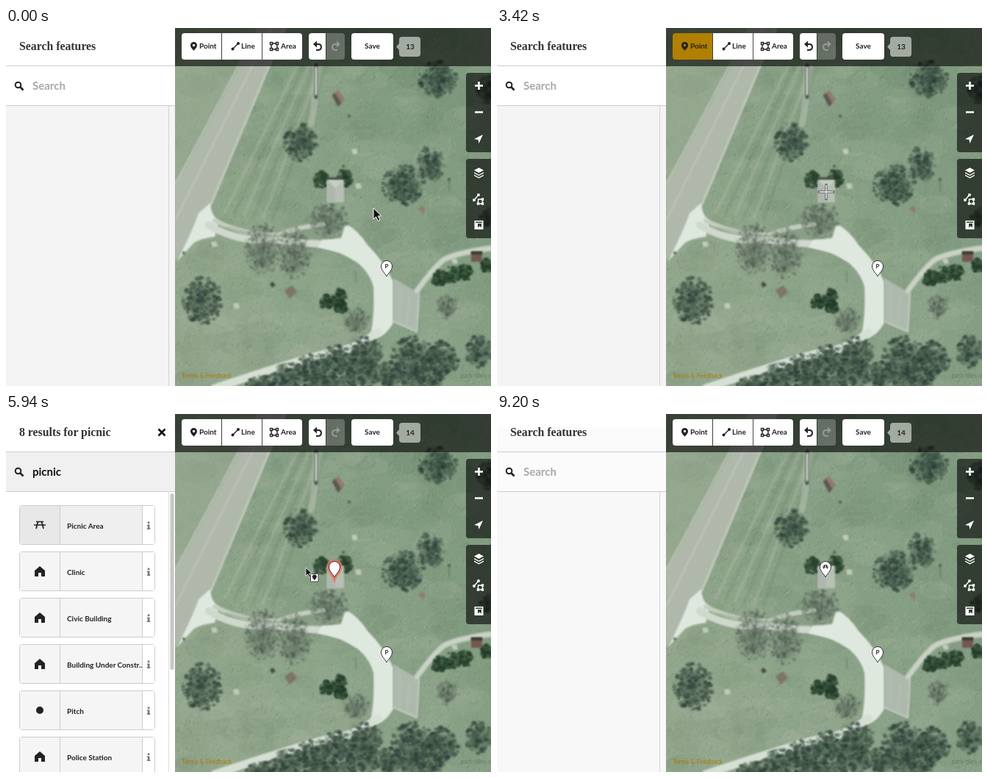
Write an HTML page with a canvas that moves like this. It is 660 px wide and 487 px high and loops after 9830 ms.

```html
<!DOCTYPE html>
<html lang="en">
<head>
<meta charset="utf-8">
<title>Adding a picnic area</title>
<style>
html, body { margin: 0; width: 100%; height: 100%; overflow: hidden; background: #fff; }
canvas, #ui { position: absolute; left: 0; top: 0; width: 660px; height: 487px; }
text { font-family: Lato, "Open Sans", sans-serif; white-space: pre; }
.title { font-family: "Liberation Serif", "Noto Serif", serif; font-weight: 700; }
.b { font-weight: 700; }
</style>
</head>
<body>
<canvas id="map" width="660" height="487"></canvas>
<svg id="ui" viewBox="0 0 660 487" xmlns="http://www.w3.org/2000/svg">
  <g id="bars"></g>
  <g id="pins"></g>
  <svg width="230" height="487" id="side"></svg>
  <g id="tip"></g>
  <g id="cursor"></g>
</svg>
<script>
const $ = id => document.getElementById(id);
const LOOP = 9830, AMBER = '#b08000', INK = '#222';

// ---- aerial view ----
function drawMap() {
  const c = $('map').getContext('2d');
  let seed = 41;
  const rnd = () => {
    seed = (seed + 0x6D2B79F5) | 0;
    let t = Math.imul(seed ^ seed >>> 15, 1 | seed);
    t ^= t + Math.imul(t ^ t >>> 7, 61 | t);
    return ((t ^ t >>> 14) >>> 0) / 4294967296;
  };
  const dot = (x, y, rx, ry, fill) => {
    c.fillStyle = fill;
    c.beginPath();
    c.ellipse(x, y, rx, ry, 0, 0, 7);
    c.fill();
  };
  const shape = (d, fill) => { c.fillStyle = fill; c.fill(new Path2D(d)); };
  const line = (d, color, w) => {
    c.strokeStyle = color;
    c.lineWidth = w;
    c.lineCap = c.lineJoin = 'round';
    c.stroke(new Path2D(d));
  };
  // dots thin out towards the rim
  const scatter = (x, y, rx, ry, n, size, colors) => {
    for (let i = 0; i < n; i++) {
      const a = rnd() * 6.283, q = Math.pow(rnd(), 0.65), s = size * (0.5 + rnd());
      dot(x + Math.cos(a) * q * rx, y + Math.sin(a) * q * ry, s, s * 0.8, colors[i % colors.length]);
    }
  };

  const grass = c.createLinearGradient(230, 400, 640, 130);
  grass.addColorStop(0, '#93a78d');
  grass.addColorStop(0.5, '#8aa287');
  grass.addColorStop(1, '#7f9a7f');
  c.fillStyle = grass;
  c.fillRect(230, 0, 430, 487);
  // broad patches, then fine grain along the mowing direction
  for (let i = 0; i < 220; i++) {
    const r = 8 + rnd() * 26;
    dot(230 + rnd() * 430, rnd() * 487, r, r * 0.6, i % 2 ? 'rgba(178,186,164,.1)' : 'rgba(92,120,95,.08)');
  }
  for (let i = 0; i < 6500; i++) {
    const x = 230 + rnd() * 430, y = rnd() * 487, l = 1 + rnd() * 3;
    c.strokeStyle = i % 2 ? 'rgba(200,210,192,.2)' : 'rgba(65,92,70,.18)';
    c.lineWidth = 1;
    c.beginPath();
    c.moveTo(x, y);
    c.lineTo(x - l * 0.6, y + l);
    c.stroke();
  }

  // highway and mowing tracks
  c.filter = 'blur(.8px)';
  shape('M230 50L262 0H346L230 205Z', 'rgba(160,176,152,.4)');
  shape('M346 0H380L279 240L268 262L230 318V216Z', '#b0b8ac');
  line('M361 0L230 262', 'rgba(198,203,193,.6)', 2);
  line('M380 0L279 240', 'rgba(208,215,203,.7)', 3);
  line('M344 0L230 213', 'rgba(200,208,194,.65)', 3);
  for (let i = 0; i < 6; i++) {
    line(`M${396 + i * 8} 52L${298 + i * 13} ${250 + i * 2}`, i % 2 ? 'rgba(95,120,97,.2)' : 'rgba(188,190,170,.32)', 4);
  }
  line('M421 50Q424 90 415 130', 'rgba(190,198,184,.5)', 9);

  // gravel drive
  const gravel = '#dfe8df';
  shape('M278 238Q279 256 290 262L284 284Q266 286 256 292L232 318Q254 276 262 252Z', gravel);
  line('M276 268Q305 286 340 288Q380 288 410 293Q445 292 476 312', '#ced8cc', 10);
  line('M284 262Q330 284 372 281Q400 270 432 267', '#c3cebf', 6);
  line('M300 272Q340 283 385 283', 'rgba(158,172,150,.7)', 3);
  shape('M462 266Q480 276 492 295Q515 318 527 345V401Q515 423 494 424Q502 398 500 352Q492 322 456 306L424 298L430 288L456 286Z', gravel);
  line('M506 414Q470 440 438 442Q385 456 284 490', '#d5dfd3', 11);

  // parking lot and footpath
  shape('M527 340L562 361L559 413L527 399Z', '#aeb9ad');
  line('M562 361L559 413L527 399', '#c6cfc4', 2);
  line('M536 352V396M549 366L545 405', '#bcc6ba', 1);
  line('M559 358Q580 328 596 315Q615 305 664 299', '#bcc7b9', 8);
  line('M559 358Q580 328 596 315Q615 305 664 299', '#cbd3c7', 4);

  // trees: x, y, rx, ry, sparse
  const dark = ['rgba(52,72,64,.6)', 'rgba(70,92,76,.6)', 'rgba(40,56,54,.6)', 'rgba(100,120,98,.5)'];
  const bare = ['rgba(67,80,74,.45)', 'rgba(94,106,96,.42)', 'rgba(125,136,120,.35)'];
  const green = ['rgba(42,70,48,.85)', 'rgba(66,96,68,.75)', 'rgba(35,55,42,.8)'];
  [
    [400, 156, 22, 28], [440, 261, 25, 26, 1], [540, 214, 29, 27], [578, 185, 18, 24],
    [588, 69, 26, 25], [349, 300, 25, 36, 1], [391, 306, 24, 35, 1], [267, 371, 27, 32],
    [476, 398, 18, 18, 1], [600, 380, 15, 16, 1], [654, 84, 12, 20], [643, 440, 18, 22],
    [348, 484, 24, 12], [385, 474, 25, 18], [420, 462, 24, 20], [452, 452, 24, 21],
    [488, 440, 24, 20], [440, 482, 36, 16], [485, 468, 26, 22], [522, 472, 20, 18],
    [555, 447, 30, 28], [592, 452, 24, 26], [565, 476, 32, 16], [654, 256, 9, 14]
  ].forEach(([x, y, rx, ry, thin]) => {
    dot(x + 1, y + 2, rx * 0.75, ry * 0.7, thin ? 'rgba(65,80,72,.2)' : 'rgba(48,66,58,.35)');
    scatter(x, y, rx, ry, rx * ry * 0.32, thin ? 1.7 : 2.3, thin ? bare : dark);
    if (thin) for (let a = 0; a < 9; a++) {
      line(`M${x} ${y + ry * 0.7}L${x + Math.cos(a * 0.7) * rx} ${y - Math.abs(Math.sin(a * 0.7)) * ry}`, 'rgba(58,70,64,.25)', 1);
    }
  });
  [[429, 206, 9, 12], [460, 205, 11, 12], [437, 373, 9, 9], [454, 367, 9, 12], [455, 380, 8, 7],
   [590, 340, 10, 10], [606, 336, 12, 12], [624, 333, 11, 11], [655, 323, 8, 9]
  ].forEach(([x, y, rx, ry]) => scatter(x, y, rx, ry, 65, 2.4, green));

  // buildings and small objects
  shape('M437 203H458V208H437Z', '#46544a');
  shape('M437 207H460V237H437Z', '#b6c0b4');
  shape('M437 207L448 218L460 207Z', '#c6cec3');
  shape('M437 207L448 218V237H437Z', '#adb7ad');
  shape('M444 92L452 84L461 97L452 107Z', '#94786e');
  shape('M444 92L448 88L456 102L452 107Z', '#565a54');
  shape('M633 304H648V318H633Z', '#74584f');
  shape('M633 304H648V308H633Z', '#383f39');
  shape('M379 357L389 350L396 359L386 368Z', '#7d7568');
  shape('M359 348L363 345L367 350L362 353Z', '#4a4a43');
  shape('M561 246L566 241L571 247L567 252Z', '#8f7c70');
  line('M422 50V94', '#4b5650', 5);
  line('M422 54V90', '#d6dcd3', 3);
  [[474, 168], [479, 215], [313, 378], [610, 317], [283, 294]].forEach(([x, y]) => {
    shape(`M${x - 4} ${y - 3}l7 -1l2 7l-7 1Z`, '#bfcabc');
  });
  [[242, 306], [467, 120], [603, 206], [459, 188]].forEach(([x, y]) => dot(x, y, 2, 2, '#4e6052'));
  line('M603 206V222M476 331V346', 'rgba(60,75,65,.5)', 1);
  c.filter = 'none';
}

// ---- drawing helpers ----
const rect = (x, y, w, h, fill, more = '') => `<rect x="${x}" y="${y}" width="${w}" height="${h}" fill="${fill}" ${more}/>`;
const box = (x, y, w, h, fill, rx = 0) => rect(x + 0.5, y + 0.5, w - 1, h - 1, fill, `stroke="#ccc" rx="${rx}"`);
const path = (d, fill, more = '') => `<path d="${d}" fill="${fill}" ${more}/>`;
const stroke = (d, color, w, more = '') => path(d, 'none', `stroke="${color}" stroke-width="${w}" ${more}`);
const text = (x, y, s, size = 10, fill = INK, cls = 'b', more = '') =>
  `<text x="${x}" y="${y + size * 0.36}" font-size="${size}" fill="${fill}" class="${cls}" ${more}>${s}</text>`;
const mid = 'text-anchor="middle"';
const at = (x, y, body, more = '') => `<g transform="translate(${x} ${y})" ${more}>${body}</g>`;
const info = (x, y) => at(x, y, rect(-1.2, -5, 2.6, 2.6, '#777') + path('M-2 -1H1.4V4H2.4V5.5H-2.2V4H-1.2V.5H-2Z', '#777'));
const down = (x, y) => path(`M${x - 4} ${y - 2}h8l-4 4Z`, '#bbb');
const drop = 'M0 0C-1.5 -4 -7.5 -8 -7.5 -14A7.5 7.5 0 0 1 7.5 -14C7.5 -8 1.5 -4 0 0Z';

const table = (k = 1, w = 1.7) =>
  `<g transform="scale(${k})">${stroke('M-5 -4.5H5M-8 0H8M-2.5 -4.5L-5 5M2.5 -4.5L5 5', INK, w)}</g>`;
const icons = {
  table: table(),
  roof: stroke('M-7 0L7 -6M-6 0V6H7', INK, 2),
  peak: path('M0 -7L9 7H-9Z', INK),
  sea: path('M0 -8C2 -3 6 0 6 3A6 5.5 0 0 1 -6 3C-6 0 -2 -3 0 -8Z', INK),
  house: path('M-7 -1L0 -7L7 -1V7H2V2H-2V7H-7Z', INK),
  dot: `<circle r="5" fill="${INK}"/>`
};

// ---- map controls ----
function bars(s) {
  const pointFill = { hover: '#ececec', on: AMBER }[s.point] || '#fff';
  const btn = (x, w, fill, left, right) => {
    const l = left ? 4 : 0, r = right ? 4 : 0;
    return path(`M${x + l} 7H${x + w - r}q${r} 0 ${r} ${r}V${43 - r}q0 ${r} ${-r} ${r}H${x + l}q${-l} 0 ${-l} ${-l}V${7 + l}q0 ${-l} ${l} ${-l}Z`, fill);
  };
  const turn = (x, flip, color) => at(x, 25, `<g transform="scale(${flip} 1)">` +
    stroke('M-2 -3H1Q5 -3 5 1Q5 5 0 5H-2', color, 2) + path('M-6 -3L-1 -7.5V1.5Z', color) + '</g>');
  const squares = pts => pts.map(([x, y]) => rect(x - 1.5, y - 1.5, 3, 3, '#fff', `stroke="${INK}" stroke-width="1.4"`)).join('');
  const panel = y => path(`M660 ${y}H630q-4 0 -4 4V${y + 104}q0 4 4 4H660Z`, 'rgba(0,0,0,.6)');
  return rect(230, 0, 430, 52, 'rgba(0,0,0,.6)') +
    btn(239, 54, pointFill, 1, 0) + btn(294, 54, '#fff') + btn(349, 54, '#fff', 0, 1) +
    btn(412, 23, '#fff', 1, 0) + btn(436, 25, 'rgba(255,255,255,.25)', 0, 1) + btn(470, 57, '#fff', 1, 1) +
    at(255.5, 31, path('M0 0C-1 -2 -4.5 -4 -4.5 -7.5A4.5 4.5 0 0 1 4.5 -7.5C4.5 -4 1 -2 0 0ZM-1.7 -7.5a1.7 1.7 0 1 0 3.4 0a1.7 1.7 0 1 0 -3.4 0Z', INK, 'fill-rule="evenodd"')) +
    text(263, 24.5, 'Point') +
    stroke('M308 29L316 21', INK, 1.5) + `<circle cx="308.5" cy="28.5" r="2" fill="${INK}"/><circle cx="316" cy="21" r="2" fill="${INK}"/>` +
    text(320, 24.5, 'Line') +
    stroke('M361 21H369V29H361Z', INK, 1.4) + squares([[361, 21], [369, 21], [361, 29], [369, 29]]) +
    text(374, 24.5, 'Area') +
    turn(424, 1, INK) + turn(449, -1, '#939b92') +
    text(498.5, 24.5, 'Save', 10, INK, 'b', mid) +
    path('M539 12H560q4 0 4 4V35q0 4 -4 4H539q-4 0 -4 -4V30L531 25.5L535 21V16q0 -4 4 -4Z', '#a3aaa1') +
    text(550, 25.5, s.count, 10, INK, 'b', mid) +
    panel(61) + panel(178) +
    stroke('M638 78.5H649M643.5 73V84M638 114.5H649', '#fff', 2.6) +
    path('M649 145L637 151L642.5 152L643.5 157Z', '#fff') +
    path('M643.5 190L650 193.5L643.5 197L637 193.5ZM637 196L643.5 199.5L650 196V197.5L643.5 201L637 197.5ZM637 199.5L643.5 203L650 199.5V201L643.5 204.5L637 201Z', '#fff') +
    stroke('M637 234L643 227M642.5 233H648.5V239H642.5Z', '#fff', 1.4) +
    [[637, 234], [643, 227], [642.5, 239], [648.5, 233], [648.5, 239]].map(([x, y]) => rect(x - 1.7, y - 1.7, 3.4, 3.4, '#fff')).join('') +
    path('M637.5 262H649.5V274H637.5ZM639 263.5V265H648V263.5ZM642 266V271.5L644.5 269.5L647 271.5V266Z', '#fff', 'fill-rule="evenodd"') +
    text(239, 473, 'Terms &amp; Feedback', 8.5, '#a87a08', '') +
    text(618.5, 473, 'park-tiles-osm', 8.5, '#6d776c', '');
}

function pins(s) {
  const outline = 'stroke="#333" stroke-width="1"';
  let out = at(518, 338, path(drop, '#fff', outline) + text(0, -14, 'P', 8, INK, 'b', mid));
  if (s.pin) {
    const glow = s.pin.sel ? path(drop, '#f2705c', 'stroke="#f2705c" stroke-width="6" stroke-opacity=".85"') : '';
    out += at(447, 222, glow + path(drop, '#fff', outline) + (s.pin.icon ? at(0, -14, table(0.5, 2.2)) : ''));
  }
  return out;
}

function tip(alpha) {
  if (!alpha) return '';
  const row = (y, s) => text(320, y, s, 10, INK, '', mid);
  return `<g opacity="${alpha}">` + path('M278 61L284 56L290 61Z', 'rgba(255,255,255,.82)') +
    rect(230, 61, 180, 72, 'rgba(255,255,255,.82)') + rect(230, 133, 180, 36, 'rgba(240,240,240,.82)') +
    row(78.5, 'Add visitor centers, entrance') + row(96.5, 'stations, picnic areas, or other') +
    row(114.5, 'points of interest to the map.') + row(150.5, 'Shortcut: <tspan class="b">1</tspan>') + '</g>';
}

// ---- sidebar ----
const title = s => text(18, 24, s, 15.8, '#333', 'title');
const close = stroke('M207.5 20.5L216.5 29.5M216.5 20.5L207.5 29.5', '#111', 2.6);
const rule = y => rect(0, y, 230, 1, '#ccc');
const lens = `<circle cx="16.5" cy="77.5" r="3.8" fill="none" stroke="${INK}" stroke-width="2"/>` + stroke('M19.5 80.5L23.5 84.5', INK, 2.6);
const placeholder = text(36, 79, 'Search', 15, '#a6aaa6');

const searchPane = late => rect(0, 0, 230, 487, '#fff') + (late ? rect(0, 18, 230, 88, '#fbfbfb') : '') +
  rect(0, 106, 230, 381, late ? '#f8f8f8' : '#f4f4f4') +
  rect(221, 106, 1, 381, '#d4d4d4') + rule(51) + rule(105) + title('Search features') + lens + placeholder;

function preset(y, icon, name, mark, alpha = 1) {
  return `<g opacity="${alpha}">` + box(18, y, 185, 54, mark ? '#efefef' : '#f5f5f5', 3) +
    rect(19, y + 1, 54, 52, mark ? '#e8e8e8' : '#f5f5f5') + rect(186, y + 1, 16, 52, '#fff') +
    rect(73, y, 1, 54, '#ccc') + rect(185, y, 1, 54, '#ccc') +
    at(46, y + 27, icons[icon]) + text(83, y + 28.5, name) + info(194, y + 27.5) + '</g>';
}

const START = [['table', 'Picnic Area'], ['roof', 'Shelter'], ['house', 'Restroom'], ['dot', 'Parking'], ['house', 'Campground'], ['peak', 'Peak']];
const EARLY = [['table', 'Picnic Area'], ['roof', 'Shelter'], ['peak', 'Peak'], null, null, ['sea', 'Sea']];
const FOUND = [['table', 'Picnic Area'], ['house', 'Clinic'], ['house', 'Civic Building'], ['house', 'Building Under Constr..'], ['dot', 'Pitch'], ['house', 'Police Station']];

function listPane(s) {
  const rows = s.rows.map((r, i) => r ? preset(124 + i * 63, r[0], r[1], i === 0 && (s.query || s.hover), i ? s.fade : 1) : '').join('');
  const caret = s.caret ? '<tspan font-weight="400" dx="-1.5">|</tspan>' : '';
  return rect(0, 0, 230, 487, '#fff') + rect(0, 52, 230, 53, s.query && s.x < 1 ? '#f0f0f0' : '#fff') +
    rect(221, 106, 1, 381, '#ddd') + rule(51) + rule(105) +
    title(s.query ? `${s.found} results for ${s.query}` : 'Select feature type') + close + lens +
    (s.query ? text(36, 79, s.query + caret, 15, '#111') : placeholder) +
    rows + rect(223.5, 108, 5, s.thumb, '#c6c6c6', 'rx="2.5"');
}

function field(y, name, rows = 1) {
  return box(18, y, 185, 29 + 28 * rows, '#fff', 3) + rect(19, y + 1, 165, 27, '#f5f5f5') +
    rect(18, y + 28, 185, 1, '#ccc') + rect(184, y, 1, 28, '#ccc') + text(28, y + 14.5, name) + info(193.5, y + 14.5);
}

function editorPane() {
  const hint = (x, y, s) => text(x, y, s, 10, '#a0a0a0', '');
  return rect(0, 0, 230, 487, '#fcfcfc') + rect(0, 0, 230, 51, '#fff') + rule(51) + rect(221, 52, 1, 435, '#ddd') +
    title('Edit feature') + close + preset(70, 'table', 'Picnic Area') +
    rect(19, 71, 54, 52, '#fff') + at(46, 97, icons.table) +
    path('M103 142L110.5 134L118 142Z', '#e9e9e9') + rect(9, 142, 203, 360, '#e9e9e9', 'rx="6"') +
    field(151, 'Name') + hint(28, 193.5, 'Common name (if any)') + rect(184, 180, 1, 27, '#ccc') +
    stroke('M188 193.5H199M193.5 188V199', '#888', 3) +
    field(216, 'Operator') + hint(28, 258.5, 'Unknown') +
    field(281, 'Address', 2) + rect(18, 337, 185, 1, '#ccc') + rect(81, 309, 1, 28, '#ccc') +
    rect(117, 338, 1, 27, '#ccc') + rect(153, 338, 1, 27, '#ccc') +
    hint(28, 323.5, '123') + hint(90, 323.5, 'Street') + down(189, 324) +
    hint(28, 351.5, 'City') + down(102, 352) + hint(127, 351.5, 'St…') + hint(163, 351.5, 'Post…') + down(188, 352) +
    field(374, 'Hours') + hint(28, 416.5, 'Unknown') +
    field(439, 'Fee') + box(28, 475, 12, 12, '#eee', 2) + rect(31, 480, 6, 1.5, '#888') +
    text(45, 481.5, 'Unknown', 10, AMBER) + stroke('M45 486.5H88', AMBER, 1, 'stroke-dasharray="1 1"') +
    rect(223.5, 54, 5, 260, '#c6c6c6', 'rx="2.5"');
}

function side(s) {
  if (s.view === 'search') return searchPane(s.late);
  const slide = at(-s.x, 0, listPane(s) + at(230, 0, editorPane()));
  return slide + (s.late ? `<g opacity=".6">${searchPane(true)}</g>` : '');
}

// ---- pointers ----
const outlined = 'stroke="#111" stroke-width="1.2" stroke-linejoin="round"';
const arrow = path('M0 0V15L3.6 11.8L6.2 17.5L8.8 16.3L6.3 10.8H11Z', '#111', 'stroke="#fff" stroke-width="1"');
const plus = 'M-9.5 0H9.5M0 -9.5V9.5';
const pointers = {
  arrow,
  place: `<g transform="scale(.75)">${arrow}</g>` + rect(6.5, 8.5, 10.5, 10.5, '#fff', 'stroke="#444" rx="1"') +
    at(11.8, 17, path('M0 0C-3 -3 -3 -4 -3 -4.5A3 3 0 0 1 3 -4.5C3 -4 3 -3 0 0Z', INK)),
  hand: path('M-1.5 8V1.5Q-1.5 0 0 0Q1.5 0 1.5 1.5V6Q3 4.6 4.4 6Q6 5 7 6.6Q9 6 9 8V11Q9 13 7.5 16H0Q-1 13.5 -5 10Q-5.5 8 -3.5 8Z', '#fff', outlined) +
    stroke('M1.5 6V9M4.4 6.4V9M7 7V9.5', '#111', 1),
  grab: path('M-4 8Q-8 3 -6 2.5Q-4.5 2 -3.5 5L-4.5 -5Q-3.5 -7 -2 -5L-1 1V-7Q.5 -9 2 -7V1L3.5 -6Q5 -7.5 6 -5.5L5.3 2L7 -2Q8.5 -3 8.7 -1.5L7 6L5 9H-3Z', '#fff', outlined),
  cross: stroke(plus, '#666', 3.4, 'stroke-linecap="square"') + stroke(plus, '#eee', 1.4),
  none: ''
};

// ---- timeline: time, pointer, x, y, changes ----
const picked = { sel: true, icon: true };
const steps = [
  [0, 'arrow', 500, 245, { view: 'search', count: 13, x: 0, rows: START, fade: 1, thumb: 150 }],
  [750, 'arrow', 476, 216],
  [900, 'arrow', 385, 122],
  [1050, 'hand', 304, 43, { point: 'hover', tip: 0.5 }],
  [1200, 'hand', 286, 34.5, { tip: 1 }],
  [1950, 'hand', 286, 34.5, { point: 'on' }],
  [2250, 'hand', 288, 37],
  [2400, 'cross', 300, 58, { tip: 0.5 }],
  [2550, 'cross', 330, 97, { tip: 0 }],
  [2700, 'cross', 368, 140],
  [2850, 'cross', 402, 178],
  [2980, 'cross', 427, 204],
  [3120, 'cross', 441, 218],
  [3270, 'cross', 446, 222],
  [3420, 'cross', 448, 223],
  [4020, 'place', 449, 223, { point: '', count: 14, pin: { sel: true } }],
  [4170, 'place', 449, 223, { view: 'list', fade: 0.5 }],
  [4310, 'place', 449, 223, { fade: 1 }],
  [4910, 'place', 449, 223, { query: 'p', found: 96, caret: true, rows: EARLY, fade: 0.12, thumb: 44 }],
  [5060, 'place', 449, 223, { query: 'pi', found: 48, fade: 0.23 }],
  [5210, 'place', 449, 223, { query: 'pic', found: 21, rows: FOUND, fade: 0.25, thumb: 100 }],
  [5350, 'place', 449, 223, { query: 'picn', found: 9, fade: 0.6, thumb: 240 }],
  [5500, 'place', 449, 223, { query: 'picnic', found: 8, fade: 1 }],
  [5940, 'place', 408, 209, { caret: false }],
  [6090, 'place', 268, 174],
  [6230, 'hand', 146, 157],
  [6380, 'hand', 107, 155, { hover: true }],
  [6830, 'hand', 107, 155, { pin: picked, x: 28 }],
  [6980, 'hand', 107, 155, { x: 133 }],
  [7130, 'hand', 107, 155, { x: 230 }],
  [7580, 'arrow', 122, 160],
  [7730, 'arrow', 180, 182],
  [7880, 'grab', 262, 214],
  [8020, 'grab', 320, 232],
  [8170, 'grab', 334, 235],
  [8610, 'grab', 354, 237],
  [8760, 'grab', 425, 243],
  [8910, 'grab', 510, 250],
  [9050, 'grab', 557, 253, { late: true, pin: { icon: true } }],
  [9200, 'none', 0, 0, { view: 'search' }]
];
let acc = {};
const states = steps.map(([time, pointer, x, y, change]) => {
  acc = { ...acc, ...change };
  return { ...acc, time, cursor: at(x, y, pointers[pointer]) };
});

let shown = -1;
function frame() {
  const t = performance.now() % LOOP;
  const i = states.findLastIndex(s => s.time <= t);
  if (i !== shown) {
    const s = states[shown = i];
    $('bars').innerHTML = bars(s);
    $('pins').innerHTML = pins(s);
    $('side').innerHTML = side(s);
    $('tip').innerHTML = tip(s.tip);
    $('cursor').innerHTML = s.cursor;
  }
  requestAnimationFrame(frame);
}
drawMap();
frame();
</script>
</body>
</html>
```
